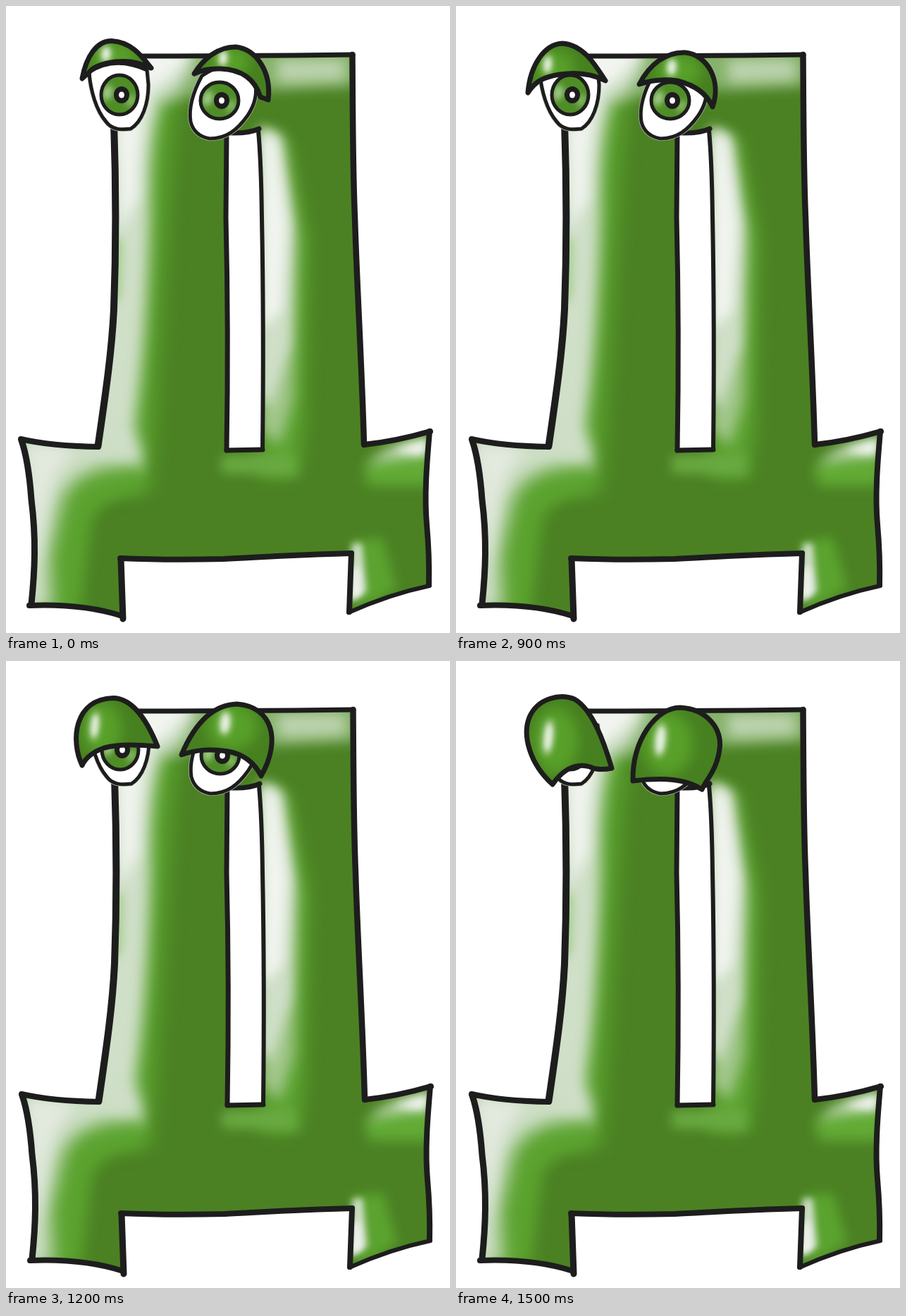
These frames come from a looping animation (630 px wide and 889 px high, 1800 ms). An HTML page with a canvas:

```html
<!DOCTYPE html>
<html lang="en">
<head>
<meta charset="utf-8">
<title>Blinking letter</title>
<style>
  html, body { margin: 0; width: 100%; height: 100%; overflow: hidden; background: #fff; }
  canvas { display: block; }
</style>
</head>
<body>
<canvas id="stage" width="630" height="889"></canvas>
<script>
const W = 630, H = 889, LOOP = 1800;
const INK = '#1d1d1d', GREEN = '#4b8123', LIGHT = '#5ba32f', PALE = '#cfdfc8', SHINE = '#f1f4ef';
const ctx = document.getElementById('stage').getContext('2d');

const BODY = new Path2D(`M154 70 L493 69 C493 160 493 230 496 300 C499 400 506 510 509 622
  Q555 616 602 603 C599 640 595 690 598 735 Q602 780 601 822 Q545 836 487 860 L491 776
  C410 778 370 781 310 784 Q230 786 163 783 L166 867 Q110 847 35 850
  C41 800 44 755 37 700 Q32 645 22 614 Q65 623 132 625
  C143 545 151 490 154 430 C157 350 157 250 154 175 Z
  M314 181 L314 300 Q318 460 314 630 L365 629 Q367 450 364 300 Q363 220 359 177 Z`);

// Each stroke: width, path
const OUTLINE = [
  [7, 'M154 71 Q330 71 493 69'],
  [8.5, 'M492.5 69 C493 160 493 230 496 300 C499 400 506 510 509 622'],
  [8, 'M509 622 Q555 617 603 603'],
  [8, 'M602 603 C599 640 594 690 598 735 Q602 780 601 821'],
  [6, 'M602 822 Q545 834 487 860'],
  [8, 'M488 859 L491 776'],
  [8, 'M491 776 C410 778 370 781 310 784 Q230 786 163 783'],
  [9, 'M164 784 L167 869'],
  [8, 'M166 865 Q110 847 34 850'],
  [9, 'M37 848 C42 800 44 755 37 700 Q33 645 23 616'],
  [8, 'M22 614 Q65 624 132 625'],
  [10, 'M131.5 624 C143 545 151 490 154 430 C157 350 157 250 154 165'],
  [7, 'M314 178 L313 300 Q317 460 314 630'],
  [7, 'M314 630 L365 629'],
  [6, 'M365 629 Q367 450 364 300 Q363 220 359 177'],
  [7, 'M320 180 Q345 181 360 174']
];

// Soft shading: colour, blur, path
const SHADES = [
  [LIGHT, 14, 'M145 60 L265 60 Q238 130 232 250 L220 450 L205 690 L120 690 Z'],
  ['#86b26b', 9, 'M200 60 L500 60 L500 114 L380 120 Q300 114 225 140 Z'],
  ['#bdd3af', 9, 'M385 76 L480 76 L482 104 L388 108 Z'],
  [PALE, 10, 'M145 60 L270 60 Q262 115 222 134 Q203 185 205 300 Q200 480 184 590 L192 660 L120 645 Z'],
  [SHINE, 9, 'M155 60 L262 60 Q244 100 204 120 Q186 190 188 270 L164 320 Z'],
  ['#a9d094', 6, 'M150 320 L167 335 L165 410 L150 430 Z'],
  [LIGHT, 10, 'M15 600 L190 650 L192 688 Q140 694 122 730 L106 860 L20 860 Z'],
  [PALE, 13, 'M15 600 L140 610 L190 625 L186 650 Q100 650 80 700 L62 780 L66 860 L20 860 Z'],
  ['#e2e9de', 9, 'M30 620 L100 630 Q62 655 54 730 L46 815 L38 720 Z'],
  [LIGHT, 12, 'M362 175 L402 190 L430 330 L424 600 L416 666 L362 668 Z'],
  ['#a4c78e', 10, 'M363 170 L394 186 L414 330 L408 560 L388 625 L363 600 Z'],
  [PALE, 8, 'M362 172 L388 184 L407 310 L404 480 L376 570 L362 550 Z'],
  [SHINE, 8, 'M366 180 L384 192 L399 310 L392 430 L366 460 Z'],
  ['#69a941', 8, 'M306 638 L408 634 L414 666 L306 662 Z'],
  ['#62ab35', 9, 'M508 654 Q545 628 605 612 L604 680 L515 680 Z'],
  [PALE, 9, 'M512 652 Q545 619 602 612 L597 638 Q548 638 512 652 Z'],
  [SHINE, 6, 'M552 631 L600 614 L594 636 Z'],
  [LIGHT, 8, 'M492 758 L535 754 L555 825 L498 862 Z'],
  [PALE, 5, 'M492 762 L506 762 L513 830 L490 846 Z'],
  [SHINE, 4, 'M494 790 L502 800 L505 834 L490 842 Z']
];

const EYES = [
  { white: 'M119 94 C121 120 129 148 143 164 C151 175 163 176 178 174 C194 164 203 139 203 112 L201 91 Q155 70 119 94 Z',
    iris: [162, 126, 26, 28], pupil: [165, 126] },
  { white: 'M279 99 C267 121 260 145 263 164 Q268 184 290 188 C314 188 329 176 344 155 C354 140 357 126 355 112 Q320 70 279 99 Z',
    iris: [304, 134, 27, 26], pupil: [307, 134] }
];

// Lid poses: left and right, each with the position and size of its highlight
const POSES = [
  { until: 900, shift: -1, lids: [
    ['M109 103 C115 71 130 49 151 49.5 C180 51 195 73 207 88 Q183 76 156 79 Q127 83 119 94 Z', 143, 68, 8, 12],
    ['M268 96 C281 75 301 58 327 58 C355 61 378 92 373 133 L362 129 C353 100 331 90 306 89 Q284 88 268 96 Z', 309, 74, 7, 12]] },
  { until: 1200, shift: 0, lids: [
    ['M102 123 C105 85 125 54 151 53 C182 55 199 86 212 106 C191 95 167 94 147 97 C124 101 113 106 102 123 Z', 130, 83, 7, 14],
    ['M260 111 C275 82 298 65 325 66 C357 69 377 106 364 143 C355 122 334 111 314 106 Q286 102 260 111 Z', 306, 87, 8, 13]] },
  { until: 1500, shift: 0, lids: [
    ['M108 148 C91 112 97 54 152 52.5 C184 53 205 96 215 121 C190 119 163 117 140 123 Q116 131 108 148 Z', 126, 92, 7, 21],
    ['M249 133 C265 95 289 62 328 61 C378 65 391 112 362 163 C353 145 338 132 314 128 C288 124 270 126 249 133 Z', 311, 88, 9, 18]] },
  { until: LOOP, shift: 0, lids: [
    ['M137 175 C104 145 94 105 104 80 C116 52 148 46 168 54 C194 69 210 115 221 152 Q202 156 190 150 C166 143 148 159 137 175 Z', 131, 108, 8, 26],
    ['M251 170 C250 112 284 66 318 66 C356 68 378 96 374 125 C370 155 355 168 349 182 C326 167 295 165 251 170 Z', 290, 112, 9, 25]] }
];

function stroke(c, path, width, color = INK) {
  c.strokeStyle = color;
  c.lineWidth = width;
  c.stroke(path);
}

function ellipse(x, y, rx, ry = rx, turn = 0) {
  const path = new Path2D();
  path.ellipse(x, y, rx, ry, turn, 0, Math.PI * 2);
  return path;
}

function soft(c, path, color, blur) {
  c.filter = `blur(${blur}px)`;
  c.fillStyle = color;
  c.fill(path);
  c.filter = 'none';
}

function shaded(c, shape, base, paint) {
  c.save();
  c.clip(shape, 'evenodd');
  c.fillStyle = base;
  c.fillRect(0, 0, W, H);
  paint();
  c.restore();
}

function drawBody(c) {
  shaded(c, BODY, GREEN, () => {
    for (const [color, blur, d] of SHADES) soft(c, new Path2D(d), color, blur);
  });
  for (const [width, d] of OUTLINE) stroke(c, new Path2D(d), width);
}

function drawEye(c, { white, iris, pupil }) {
  const shape = new Path2D(white), ring = ellipse(...iris);
  const [x, y] = iris;
  stroke(c, shape, 6.5, '#b4bfae');
  c.fillStyle = '#fff';
  c.fill(shape);
  stroke(c, shape, 5);
  shaded(c, ring, '#4f8d27', () => {
    soft(c, ellipse(x - 17, y - 3, 7, 11, 0.3), '#a5cc8d', 4);
    soft(c, ellipse(x + 16, y + 8, 6, 9, 0.5), '#8abb69', 4);
  });
  stroke(c, ring, 5);
  c.fillStyle = INK;
  c.fill(ellipse(...pupil, 11, 12));
  c.fillStyle = '#fff';
  c.fill(ellipse(...pupil, 4, 4.5));
}

function drawLid(c, [d, x, y, rx, ry]) {
  const shape = new Path2D(d);
  shaded(c, shape, '#478020', () => {
    soft(c, ellipse(x + 10, y + 5, rx * 4, ry * 1.8), '#58a029', 9);
    soft(c, ellipse(x, y, rx, ry, 0.1), '#b5d5a2', 5);
    soft(c, ellipse(x, y, rx * 0.55, ry * 0.7, 0.1), '#e6f0df', 3);
  });
  stroke(c, shape, 7);
}

function renderPose({ shift, lids }) {
  const layer = document.createElement('canvas');
  layer.width = W;
  layer.height = H;
  const c = layer.getContext('2d');
  c.lineCap = c.lineJoin = 'round';
  c.fillStyle = '#fff';
  c.fillRect(0, 0, W, H);
  c.translate(shift, 0);
  drawBody(c);
  EYES.forEach(eye => drawEye(c, eye));
  lids.forEach(lid => drawLid(c, lid));
  return layer;
}

const pictures = POSES.map(renderPose);

function tick(now) {
  const time = now % LOOP;
  ctx.drawImage(pictures[POSES.findIndex(pose => time < pose.until)], 0, 0);
  requestAnimationFrame(tick);
}

ctx.drawImage(pictures[0], 0, 0);
requestAnimationFrame(tick);
</script>
</body>
</html>
```
